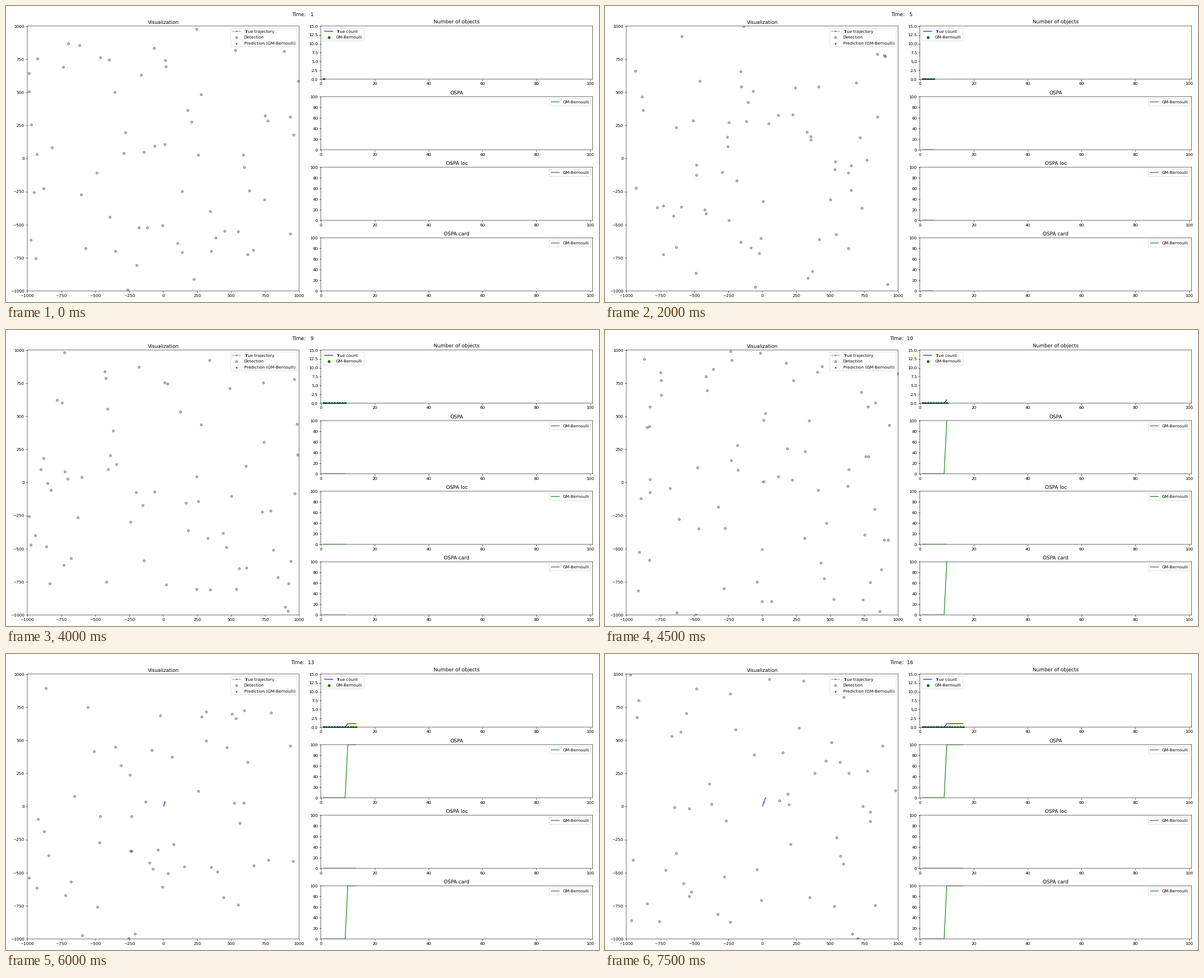
Write a matplotlib script that moves like this. It is 1058 px wide and 529 px high and loops after 8000 ms.

```python
import numpy as np
import matplotlib.pyplot as plt
from matplotlib.animation import FuncAnimation

STEPS, BIRTH = 16, 10
GREEN = "green"

# Unsnapped strokes and unhinted text keep subpixel positions at this low dpi
plt.rcParams.update({"font.family": "DejaVu Sans", "text.hinting": "none", "path.snap": False})

fig = plt.figure(figsize=(20, 10), dpi=52.9)
grid = fig.add_gridspec(4, 2)
title = fig.suptitle("")


def add_metric(name, row, ymax, ystep):
    ax = fig.add_subplot(grid[row, 1])
    ax.set(title=name, xlim=(0, 101), ylim=(0, ymax), xticks=range(0, 101, 20))
    ax.set_yticks(np.arange(0, ymax + 0.1, ystep))
    return ax


# Simulated scene: uniform clutter plus one object born at BIRTH
rng = np.random.default_rng(7)
clutter = [rng.uniform(-1000, 1000, (rng.poisson(60), 2)) for _ in range(STEPS)]
clutter[BIRTH - 1] = np.vstack([clutter[BIRTH - 1], (12, 5)])

age = np.arange(STEPS - BIRTH + 1)
track = np.column_stack([2 + 3.3 * age + 0.05 * age**2, 8 + 9.7 * age - 0.05 * age**2])

times = np.arange(1, STEPS + 1)
count = (times >= BIRTH).astype(float)
metrics = {"OSPA": 100 * count, "OSPA loc": 0 * count, "OSPA card": 100 * count}

# Scene panel
scene = fig.add_subplot(grid[:, 0])
ticks = range(-1000, 1001, 250)
scene.set(title="Visualization", xlim=(-1000, 1000), ylim=(-1000, 1000),
          xticks=ticks, yticks=ticks)
path, = scene.plot([], [], "b.-", lw=1.3, ms=4, alpha=0.5, label="True trajectory")
dots = scene.scatter([], [], c="k", alpha=0.3, label="Detection")
scene.scatter([], [], c=GREEN, marker=".", label="Prediction (GM-Bernoulli)")
scene.legend(loc="upper right")

# Metric panels
ax = add_metric("Number of objects", 0, 15, 2.5)
true_line, = ax.plot([], [], "b", label="True count")
estimates = ax.scatter([], [], c=GREEN, label="GM-Bernoulli")
ax.legend(loc="upper left")

curves = []
for row, (name, values) in enumerate(metrics.items(), 1):
    ax = add_metric(name, row, 100, 20)
    line, = ax.plot([], [], color=GREEN, label="GM-Bernoulli")
    ax.legend(loc="upper right")
    curves.append((line, values))


def update(i):
    t = i + 1
    title.set_text(f"Time: {t:3d}")
    dots.set_offsets(clutter[i])
    path.set_data(*track[:max(0, t - BIRTH + 1)].T)
    true_line.set_data(times[:t], count[:t])
    estimates.set_offsets(np.column_stack([times[:t], np.zeros(t)]))
    for line, values in curves:
        line.set_data(times[:t], values[:t])


update(0)
fig.tight_layout()
anim = FuncAnimation(fig, update, frames=STEPS, interval=500, init_func=lambda: update(0),
                     repeat=True, repeat_delay=0, blit=False)
plt.show()
```
